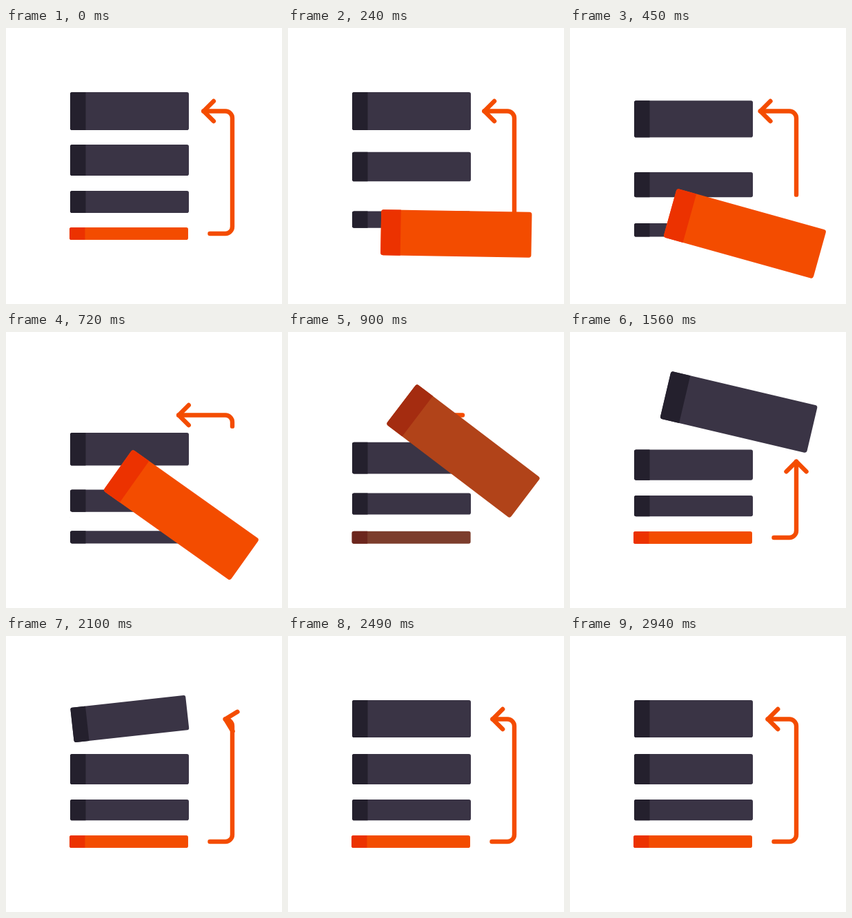
These frames come from a looping animation (400 by 400 pixels, 5.03 s). An HTML page:

```html
<!DOCTYPE html>
<html lang="en">
<head>
<meta charset="utf-8">
<title>Stack reorder</title>
<style>
  html, body { margin: 0; width: 100%; height: 100%; overflow: hidden; background: #fff; }
  svg { display: block; width: 100%; height: 100%; }
  .arrow path { fill: none; stroke: #f44c00; stroke-width: 6.4; stroke-linecap: round; stroke-linejoin: round; }
</style>
</head>
<body>
<svg viewBox="0 0 400 400">
  <g class="arrow">
    <path id="line" d="M295.5 298H318A10 10 0 0 0 328 288V130.5A10 10 0 0 0 318 120.5H180"/>
    <path id="head"/>
  </g>
  <g id="blocks"></g>
</svg>
<script>
const LOOP = 5030;
const NS = 'http://www.w3.org/2000/svg';
const DARK = { body: [58, 52, 69], spine: [36, 32, 45] };
const HOT = { body: [243, 76, 0], spine: [236, 50, 0] };
const PATH_END = 243; // arrow length at rest

const line = document.getElementById('line');
const head = document.getElementById('head');
const blocks = document.getElementById('blocks');

const lerp = (a, b, k) => a + (b - a) * k;
const mix = (a, b, k) => `rgb(${a.map((v, i) => Math.round(lerp(v, b[i], k)))})`;

// Smooth step from 0 to 1 between two times.
function ease(t, from, to) {
  const u = Math.min(1, Math.max(0, (t - from) / (to - from)));
  return u * u * (3 - 2 * u);
}

// Critically damped spring from 0 to 1.
function settle(t, start, tau) {
  const x = Math.max(0, t - start) / tau;
  return 1 - (1 + x) * Math.exp(-x);
}

function makeBlock() {
  const g = document.createElementNS(NS, 'g');
  const body = g.appendChild(document.createElementNS(NS, 'rect'));
  const spine = g.appendChild(document.createElementNS(NS, 'path'));
  blocks.append(g);
  return { g, body, spine };
}

function drawBlock(b, { cx, cy, w, h, angle = 0, heat }) {
  const r = 2.8 * w / 172, x = -w / 2, y = -h / 2, s = w * 22.5 / 172;
  b.g.setAttribute('transform', `translate(${cx} ${cy}) rotate(${angle})`);
  for (const [k, v] of Object.entries({ x, y, width: w, height: h, rx: r })) b.body.setAttribute(k, v);
  b.spine.setAttribute('d',
    `M${x + s} ${y}H${x + r}a${r} ${r} 0 0 0 ${-r} ${r}V${-y - r}a${r} ${r} 0 0 0 ${r} ${r}H${x + s}Z`);
  b.body.setAttribute('fill', mix(DARK.body, HOT.body, heat));
  b.spine.setAttribute('fill', mix(DARK.spine, HOT.spine, heat));
}

// Bars drop one slot each, the lowest first: [top, bottom] before and after.
const bars = [
  { from: [93, 148], to: [171, 215], start: 335, tau: 165 },
  { from: [169, 214], to: [237, 267.3], start: 125, tau: 165 },
  { from: [236, 268], to: [289, 307], start: 30, tau: 113, heats: true }
].map(b => ({ ...b, el: makeBlock() }));
const mover = makeBlock();

function drawBars(t, heat) {
  for (const b of bars) {
    const k = settle(t, b.start, b.tau);
    const [top, bottom] = b.from.map((v, i) => lerp(v, b.to[i], k));
    const hot = b.heats ? heat : 0;
    drawBlock(b.el, { cx: 179 - hot, cy: (top + bottom) / 2, w: 172, h: bottom - top, heat: hot });
  }
}

// The bottom bar grows, swings up over the stack and lands on top.
function drawMover(t, heat) {
  const grow = settle(t, 30, 60);
  const lift = settle(t, 635, 112);
  const land = ease(t, 1400, 2130);
  const rest = ease(t, 2100, 2450);
  const swing = Math.max(-6.3, 29.8 - 0.0367 * (t - 1110));
  drawBlock(mover, {
    cx: lerp(lerp(178, 254, grow), 179, land),
    cy: lerp(298, 115, lift) + 5 * land,
    w: lerp(lerp(172, 225.5, grow), 167.5, land) + 4.5 * rest,
    h: lerp(lerp(18, 73.5, grow), 50.5, land) + 3.5 * rest,
    angle: swing * ease(t, 185, 935) * (1 - ease(t, 2100, 2350)),
    heat
  });
}

function drawArrow(tail, tip, size) {
  line.style.visibility = head.style.visibility = size > 0.01 ? 'visible' : 'hidden';
  line.setAttribute('stroke-dasharray', `${Math.max(0.1, tip - tail)} 2000`);
  line.setAttribute('stroke-dashoffset', -tail);
  const p = line.getPointAtLength(tip);
  const back = line.getPointAtLength(Math.max(0, tip - 5));
  const turn = Math.atan2(p.y - back.y, p.x - back.x) * 180 / Math.PI;
  const a = 14.5 * size;
  head.setAttribute('d', `M${-a} ${-a}L0 0L${-a} ${a}`);
  head.setAttribute('transform', `translate(${p.x} ${p.y}) rotate(${turn})`);
}

function render(t) {
  const swap = ease(t, 800, 1050);
  drawBars(t, swap);
  drawMover(t, 1 - swap);
  if (t < 960) {
    const u = Math.max(0, t - 30) / 690;
    drawArrow(189 * u ** 1.63, PATH_END + 36 * u ** 2.5, 1 - ease(t, 840, 950));
  } else {
    drawArrow(0, PATH_END * Math.min(1, 1.02 * settle(t, 900, 353)), ease(t, 980, 1070));
  }
}

const start = performance.now();
function tick() {
  render((performance.now() - start) % LOOP);
  requestAnimationFrame(tick);
}
tick();
</script>
</body>
</html>
```
